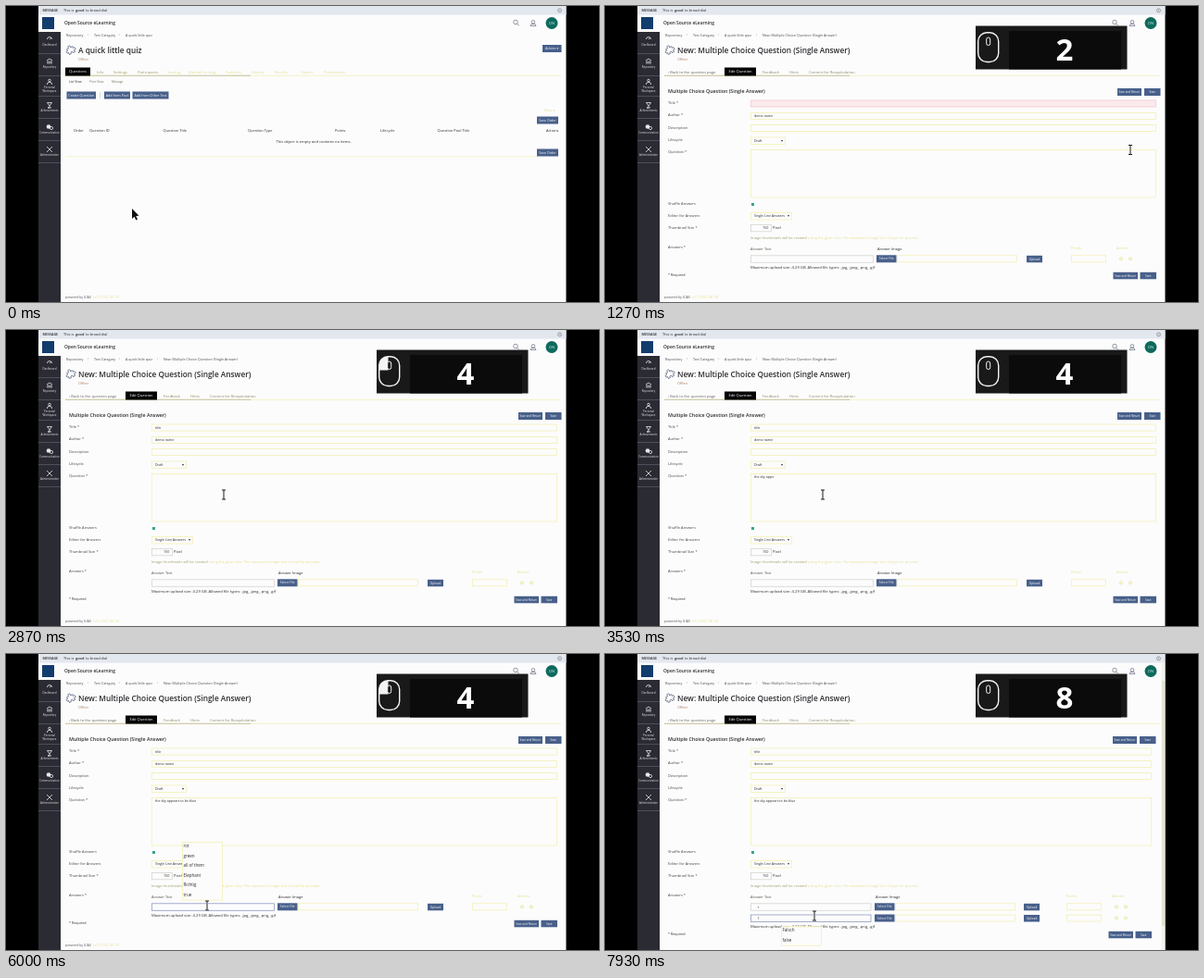
Recreate the animation shown at these times as an HTML page with a canvas. Size 640 by 320 pixels, loop 8 s.

```html
<!DOCTYPE html>
<html lang="en">
<head>
<meta charset="utf-8">
<title>Creating a quiz question</title>
<style>
html, body { margin: 0; width: 100%; height: 100%; overflow: hidden; background: #000; }
canvas { display: block; width: 640px; height: 320px; }
</style>
</head>
<body>
<canvas id="stage" width="640" height="320"></canvas>
<script>
const ctx = document.getElementById('stage').getContext('2d');
const LOOP = 8000;
const INK = '#2b2b2e', PALE = '#e3e08a', LINE = '#f3f1b6', PAPER = '#fcfcfd', BUTTON = '#48608a';
const PANEL = '#19191a', KEY = '#0b0b0c', LIGHT = '#f4f4f4';
const FORM_AT = 700, ROW_AT = 7150;

// Pointer stops: time, x, y
const POINTER = [
  [70, 136, 219], [350, 81, 96], [500, 81, 96], [900, 580, 110], [1270, 567, 155.5],
  [1650, 185, 105], [2250, 185, 105], [2700, 235, 178], [5000, 235, 178],
  [5500, 217, 272], [6450, 217, 272], [6750, 542, 274.5], [6900, 542, 274.5],
  [7050, 567, 273], [7200, 567, 273], [7500, 226, 283]
];
// Clicks: time, number on the overlay
const CLICKS = [[350, 1], [680, 2], [1650, 3], [2720, 4], [5850, 4], [6680, 5], [7050, 6], [7300, 7], [7580, 8]];
const PRESS = 250, FADE_AT = 4300, FADE = 250;

function box(x, y, w, h, fill) {
  ctx.fillStyle = fill;
  ctx.fillRect(x, y, w, h);
}

function text(str, x, y, size = 3.9, color = INK, weight = 400, align = 'left') {
  ctx.font = `${weight} ${size}px "Open Sans", sans-serif`;
  ctx.textAlign = align;
  ctx.textBaseline = 'middle';
  ctx.fillStyle = color;
  ctx.fillText(str, x, y);
}

function path(points, color, width = 0.8, close = false) {
  ctx.beginPath();
  points.forEach(([x, y]) => ctx.lineTo(x, y));
  if (close) ctx.closePath();
  ctx.strokeStyle = color;
  ctx.lineWidth = width;
  ctx.stroke();
}

function ring(x, y, r, color, width = 0.8, from = 0, to = Math.PI * 2) {
  ctx.beginPath();
  ctx.arc(x, y, r, from, to);
  ctx.strokeStyle = color;
  ctx.lineWidth = width;
  ctx.stroke();
}

function disc(x, y, r, color) {
  ctx.beginPath();
  ctx.arc(x, y, r, 0, Math.PI * 2);
  ctx.fillStyle = color;
  ctx.fill();
}

function button(label, x, y, w, h = 8, size = 3.4) {
  box(x, y, w, h, BUTTON);
  text(label, x + w / 2, y + h / 2 + 0.2, size, '#fff', 400, 'center');
}

function field(x, y, w, h, value = '', border = LINE, fill = PAPER) {
  box(x, y, w, h, fill);
  ctx.strokeStyle = border;
  ctx.lineWidth = 0.8;
  ctx.strokeRect(x + 0.5, y + 0.5, w - 1, h - 1);
  text(value, x + 4, y + Math.min(h, 8) / 2 + 0.3, 3.6);
}

function select(x, y, w, value) {
  field(x, y, w, 8.5, value);
  text('▾', x + w - 4, y + 4.2, 4, INK, 400, 'center');
}

function typed(str, t, start, end) {
  const part = Math.max(0, Math.min(1, (t - start) / (end - start)));
  return str.slice(0, Math.round(part * str.length));
}

function sidebarIcon(index, y) {
  const x = 47, c = '#e8e8ec';
  if (index === 0) { ring(x, y, 2.5, c, 0.8, Math.PI, 0); path([[x, y], [x + 2, y - 2]], c); }
  if (index === 1) { path([[x - 3, y - 1], [x, y - 3], [x + 3, y - 1]], c); for (const d of [-2, 0, 2]) box(x + d - 0.5, y - 0.5, 1, 3, c); }
  if (index === 2) { ring(x, y - 1.5, 1.3, c); ring(x, y + 3, 2.7, c, 0.8, Math.PI, 0); }
  if (index === 3) { path([[x - 2.5, y - 2.5], [x + 2.5, y - 2.5], [x, y + 1]], c, 0.8, true); path([[x, y + 1], [x, y + 3], [x - 2, y + 3], [x + 2, y + 3]], c); }
  if (index === 4) { disc(x - 1, y - 0.5, 2.3, c); ring(x + 2, y + 1, 1.6, c); }
  if (index === 5) { path([[x - 3, y - 3], [x + 3, y + 3]], c); path([[x + 3, y - 3], [x - 3, y + 3]], c); }
}

function puzzle() {
  ctx.save();
  ctx.translate(69.8, 47.5);
  ctx.rotate(-0.45);
  ctx.scale(0.85, 0.85);
  ctx.beginPath();
  ctx.moveTo(-4, -3);
  ctx.lineTo(-1.3, -3);
  ctx.arc(0, -4.2, 1.6, 2.4, 0.75);
  ctx.lineTo(4, -3);
  ctx.lineTo(4, -0.8);
  ctx.arc(4.8, 0.6, 1.6, -2.1, 2.1);
  ctx.lineTo(4, 4.5);
  ctx.lineTo(1.3, 4.5);
  ctx.arc(0, 4, 1.4, 0.4, 2.74, true);
  ctx.lineTo(-4, 4.5);
  ctx.lineTo(-4, 2);
  ctx.arc(-4.6, 0.6, 1.5, 1.1, -1.1);
  ctx.closePath();
  ctx.strokeStyle = '#56637e';
  ctx.lineWidth = 0.9;
  ctx.stroke();
  ctx.restore();
}

function frame(isForm) {
  box(0, 0, 640, 320, '#000');
  box(35, 0, 569.5, 320, PAPER);
  box(35, 0, 569.5, 9.5, '#e3e8ef');
  text('MESSAGE', 39.5, 5, 3.7, INK, 600);
  text('This is ', 62, 5, 3.9);
  text('good', 75, 5, 3.9, INK, 600);
  text('to broad dial', 86, 5, 3.9);
  ring(597.5, 4.8, 2, '#70757e', 0.6);
  text('×', 597.5, 4.8, 3.5, '#70757e', 400, 'center');

  box(39, 12, 13, 13, '#123c6d');
  text('Open Source eLearning', 63, 18.7, 4.9, INK, 600);
  ring(550, 17.5, 2.3, '#66707f', 0.7);
  path([[551.7, 19.2], [553.7, 21.3]], '#66707f');
  ring(569, 17.3, 1.8, '#66707f', 0.7);
  path([[566, 21.5], [567, 19.5], [571, 19.5], [572, 21.5]], '#66707f', 0.7, true);
  disc(589, 18.5, 6.5, '#0c6a5c');
  text('DN', 589, 18.6, 4, '#dcebe8', 400, 'center');

  box(35, 28, 24, 292, '#2b2b33');
  ['Dashboard', 'Repository', 'Personal', 'Achievements', 'Communication', 'Administration'].forEach((label, i) => {
    const y = [36, 60, 82, 107, 131, 155][i];
    sidebarIcon(i, y);
    text(label, 47, i === 2 ? 88 : y + 6.7, 2.9, '#e8e8ec', 400, 'center');
    box(35, [51, 75, 97, 121, 145, 169][i], 24, 0.6, '#66667a');
  });
  text('Workspace', 47, 92, 2.9, '#e8e8ec', 400, 'center');

  const crumbs = [['Repository', 65], ['Test Category', 95], ['A quick little quiz', 129]];
  if (isForm) crumbs.push(['New: Multiple Choice Question (Single Answer)', 170]);
  crumbs.forEach(([label, x], i) => {
    text(label, x, 31.8, 3.7, '#4b4b50');
    if (i) text('›', x - 7, 31.4, 4, '#777');
  });
  puzzle();
  text(isForm ? 'New: Multiple Choice Question (Single Answer)' : 'A quick little quiz', 78, 48.8, 8.3, INK, 600);
  text('Offline', 78, 57.8, 3.6, '#b0785c');
  box(64, 74.8, 535, 0.8, LINE);
}

function tabs(active, x, w, others) {
  box(64, 74.8, 200, 0.8, '#b9b79a');
  box(x, 66.5, w, 9, '#050505');
  text(active, x + w / 2, 71.4, 4, '#fff', 400, 'center');
  others.forEach(([label, left, color]) => text(label, left, 71.6, 4.05, color));
}

function quizPage() {
  const mid = '#a09e62';
  tabs('Questions', 64, 27, [
    ['Info', 98, mid], ['Settings', 116, mid], ['Participants', 142, mid], ['Scoring', 174, PALE],
    ['Manual Scoring', 197, PALE], ['Statistics', 237, PALE], ['History', 265, PALE],
    ['Results', 290, PALE], ['Export', 319, PALE], ['Permissions', 343, PALE]
  ]);
  button('Actions ▾', 579, 42, 20.5, 8);
  text('List View', 68, 82, 3.4);
  text('Print View', 90, 82, 3.3, '#77775f');
  text('Manage', 114, 82, 3.3, '#77775f');
  button('Create Question', 65.5, 92.5, 31.5, 8, 3.7);
  box(101.5, 93, 0.6, 7, '#bbb');
  button('Add from Pool', 106, 92.5, 28, 8, 3.7);
  button('Add from Other Test', 136.5, 92.5, 39, 8, 3.7);
  text('Rows ▾', 581, 113, 3.5, PALE);
  button('Save Order', 573, 119.5, 23, 8, 3.6);
  [['Order', 73], ['Question ID', 90], ['Question Title', 169.5], ['Question Type', 261], ['Points', 355],
   ['Lifecycle', 404], ['Question Pool Title', 465.5], ['Actions', 583]].forEach(([label, x]) => text(label, x, 135.4, 3.95));
  text('This object is empty and contains no items.', 332, 147.4, 4.05, INK, 400, 'center');
  box(64, 162.5, 509, 0.7, LINE);
  button('Save Order', 573, 154.5, 23, 8, 3.6);
  footer();
}

function footer() {
  text('powered by ILIAS', 64, 314.7, 3.5, '#55555a');
  text('(v7.3 2021-08-19)', 94, 314.7, 3.5, PALE);
}

function answerRow(y, value, shift, isFocused) {
  field(157, y, 133 - shift / 2, 8.5, '', isFocused ? '#8e9cc0' : '#d5d6cf');
  text(value, 165, y + 4.6, 3.6);
  button('Select File', 293 - shift * 0.4, y, 21.5, 8, 3.5);
  field(315 - shift * 0.4, y, 130, 8);
  button('Upload', 455 - shift * 0.6, y + 0.5, 17, 7.5, 3.4);
  field(503 - shift, y, 38, 8);
  for (const x of [557, 567]) {
    ring(x - shift, y + 4, 1.7, PALE, 0.6);
    path([[x - shift - 1, y + 4], [x - shift + 1, y + 4]], PALE, 0.6);
  }
}

function suggestions(labels, y) {
  field(190, y, 44, labels.length * 10.6);
  labels.forEach((label, i) => text(label, 191.5, y + 4.8 + i * 10.6, 4.5));
}

function formPage(t) {
  const twoRows = t >= ROW_AT;
  const shift = twoRows ? 5 : 0;
  const drop = twoRows ? 12 : 0;
  const width = 438 - shift;
  tabs('Edit Question', 129, 34, [
    ['‹ Back to the question page', 68, '#66665c'], ['Feedback', 170, '#8c8b65'],
    ['Hints', 199, '#8c8b65'], ['Content for Recapitulation', 220, '#8c8b65']
  ]);
  text('Multiple Choice Question (Single Answer)', 68, 93, 5.3, INK, 600);
  button('Save and Return', 553 - shift, 89, 26, 8, 3);
  button('Save', 582 - shift, 89, 17.5, 8, 3);

  [['Title *', 105], ['Author *', 118], ['Description', 131.5], ['Lifecycle', 145], ['Question *', 158],
   ['Shuffle Answers', 213.5], ['Editor for Answers', 226.7], ['Thumbnail Size *', 240], ['Answers *', 261.3]]
    .forEach(([label, y]) => text(label, 68, y, 4, '#45443c', 500));
  text('* Required', 68, 291 + drop, 3.7);

  const isEmpty = t < 1800;
  field(157, 101.5, width, 8, typed('title', t, 1800, 2200), isEmpty ? '#f2cdd4' : LINE, isEmpty ? '#fbeaec' : PAPER);
  field(157, 115, width, 8, 'demo name');
  field(157, 128, width, 8);
  select(157, 141.5, 38, 'Draft');
  field(157, 155, width, 52.5, typed('the sky appears to be blue', t, 3000, 4150));
  box(158, 213, 3, 3, '#3ba18f');
  select(157, 223, 45, 'Single Line Answers');
  field(157, 236, 23, 8.3, '', '#d5d6cf');
  text('150', 170, 240.5, 3.7);
  text('Pixel', 181, 240, 4);
  text('Image thumbnails will be created', 157, 250.8, 3.95, '#a3a168');
  text('using the given size. The maximum image size is kept for preview.', 219, 250.8, 3.95, PALE);

  text('Answer Text', 157, 262.5, 4, '#55554c');
  text('Answer Image', 294 - shift * 0.4, 262.5, 4);
  text('Points', 503 - shift, 262.3, 3.8, PALE);
  text('Actions', 552 - shift, 262.3, 3.8, PALE);
  answerRow(269.3, t >= 6250 ? 't' : '', shift, t > 5850 && !twoRows);
  if (twoRows) answerRow(281.5, t >= 7800 ? 'f' : '', shift, t > 7580);
  text('Maximum upload size: 4.29 GB. Allowed file types: .jpg, .jpeg, .png, .gif', 157, 282.9 + drop, 4.15);
  button('Save and Return', 548.5 - shift, 287.8 + drop, 26.5, 7.5, 3);
  button('Save', 577.5 - shift, 287.8 + drop, 17.5, 7.5, 3);
  if (!twoRows) footer();
  else {
    box(600.5, 9.5, 4, 310.5, '#f2f2ee');
    box(601, 29, 3, 265, '#e4e3cc');
  }

  if (t >= 5880 && t < 6250) suggestions(['rot', 'green', 'all of them', 'Elephant', 'Richtig', 'true'], 203);
  if (t >= 6250 && t < 6860) suggestions(['true'], 283.3);
  if (t >= 7820) suggestions(['Falsch', 'false'], 294.5);
}

function mouseIcon(isPressed) {
  ctx.beginPath();
  ctx.roundRect(402.7, 28.7, 22, 31.8, 9.5);
  ctx.strokeStyle = LIGHT;
  ctx.lineWidth = 1.4;
  ctx.stroke();
  if (isPressed) {
    ctx.save();
    ctx.clip();
    box(402, 28, 10.5, 15.5, LIGHT);
    ctx.restore();
  }
  ctx.beginPath();
  ctx.roundRect(411.7, 34, 4, 8.5, 2);
  ctx.fillStyle = PANEL;
  ctx.fill();
  ctx.lineWidth = 1;
  ctx.stroke();
}

function overlay(t) {
  const click = CLICKS.filter(([at]) => at <= t).pop();
  if (!click) return;
  const [at, number] = click;
  const fading = at < FADE_AT && t >= FADE_AT;
  const alpha = fading ? 1 - (t - FADE_AT) / FADE : 1;
  if (alpha <= 0) return;
  if (!fading) {
    box(400, 21.5, 163.5, 47, PANEL);
    mouseIcon(t - at < PRESS);
  }
  ctx.globalAlpha = alpha;
  box(436, 27, 121, fading ? 43 : 41.5, KEY);
  ctx.globalAlpha = 1;
  ctx.font = 'bold 33px "Open Sans", sans-serif';
  ctx.textAlign = 'center';
  ctx.textBaseline = 'alphabetic';
  ctx.fillStyle = '#fff';
  ctx.fillText(number, 496, 58.5);
}

function pointerAt(t) {
  const next = POINTER.findIndex(([at]) => at > t);
  if (next === 0) return POINTER[0].slice(1);
  if (next < 0) return POINTER[POINTER.length - 1].slice(1);
  const [t0, x0, y0] = POINTER[next - 1], [t1, x1, y1] = POINTER[next];
  const p = (t - t0) / (t1 - t0), k = p * p * (3 - 2 * p);
  return [x0 + (x1 - x0) * k, y0 + (y1 - y0) * k];
}

function pointer(t) {
  const [x, y] = pointerAt(t);
  if (t < 1050 || (t > 6960 && t < 7350)) {
    const arrow = [[0, 0], [0, 11], [2.5, 8.7], [4.3, 12.5], [6, 11.7], [4.3, 8], [7.5, 7.7]];
    path(arrow.map(([dx, dy]) => [x + dx, y + dy]), '#fff', 1.2, true);
    ctx.fillStyle = '#101010';
    ctx.fill();
    return;
  }
  for (const [color, w] of [['#fff', 2], ['#181818', 1]]) {
    path([[x, y - 5], [x, y + 5]], color, w);
    path([[x - 2, y - 5], [x + 2, y - 5]], color, w);
    path([[x - 2, y + 5], [x + 2, y + 5]], color, w);
  }
}

function draw(now) {
  const t = now % LOOP;
  const isForm = t >= FORM_AT;
  frame(isForm);
  if (isForm) formPage(t);
  else quizPage();
  overlay(t);
  pointer(t);
  requestAnimationFrame(draw);
}
requestAnimationFrame(draw);
</script>
</body>
</html>
```
